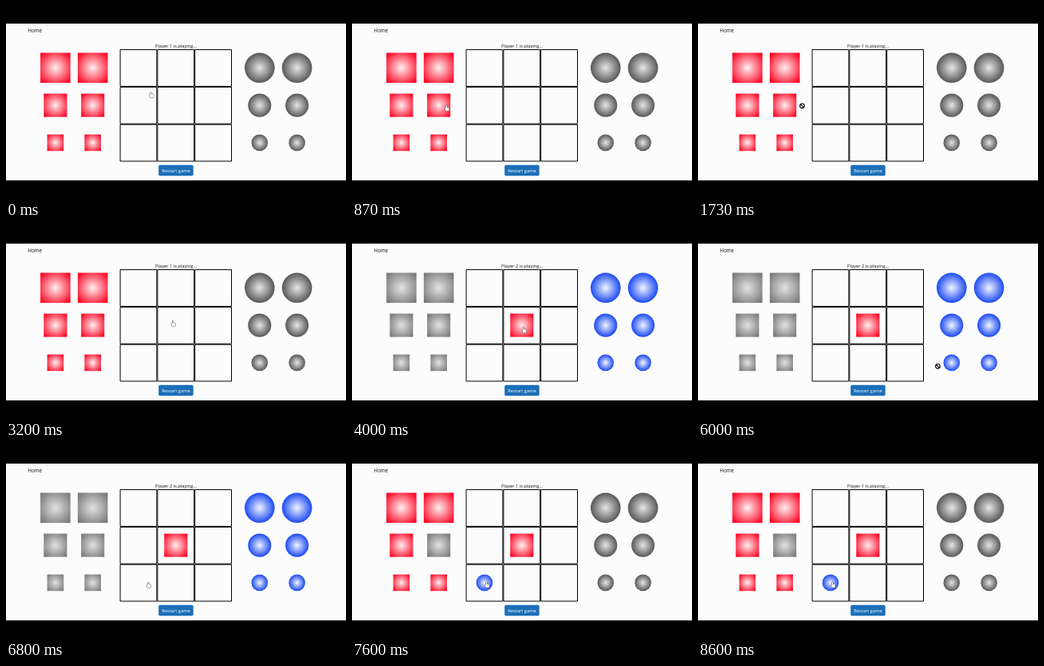
An HTML page with a canvas for the animation above (8670 ms loop, 426 by 240 pixels).

```html
<!DOCTYPE html>
<html lang="en">
<head>
<meta charset="utf-8">
<title>Board game</title>
<style>
html, body { margin: 0; width: 100%; height: 100%; overflow: hidden; background: #000; }
canvas { display: block; width: 100vw; height: 100vh; }
</style>
</head>
<body>
<canvas id="stage"></canvas>
<script>
const W = 426, H = 240, LOOP = 8670;
const canvas = document.getElementById('stage');
const ctx = canvas.getContext('2d');
const FONT = '"Open Sans", "Noto Sans", sans-serif';

// Board and piece racks share one grid step
const STEP = 46.8;
const BOARD = { x: 142.6, y: 54.1 };
const LEFT_X = 61.9, RIGHT_X = 317.8;
const rowY = row => BOARD.y + (row + 0.5) * STEP - 0.2;
const cellX = col => BOARD.x + (col + 0.5) * STEP;
const pieceSize = row => 37.6 - 8.5 * row;

const RED = ['#fff0f0', '#fc0020'];
const RED_OFF = ['#e2e2e2', '#78787b'];
const BLUE = ['#f2f5ff', '#1c4af2'];
const BLUE_OFF = ['#e6e6e6', '#58585b'];

const GRAB_1 = 1480, DROP_1 = 3620;
const GRAB_2 = 5740, DROP_2 = 7080;

// Pointer glides, each starting where the previous one ended
const REST = { x: 181.5, y: 107.5 };
const GLIDES = [
  { start: 250, end: 1050, x: 109, y: 126.5 },
  { start: GRAB_1, end: 2320, x: 209, y: 118.5 },
  { start: 3200, end: DROP_1, x: 215, y: 126.5 },
  { start: 4850, end: 5500, x: 317, y: 176 },
  { start: GRAB_2, end: 6996, x: 168.5, y: 170 }
];

const clamp01 = u => Math.min(1, Math.max(0, u));
const ease = u => u * u * (3 - 2 * u);

function pointerAt(t) {
  return GLIDES.reduce((p, g) => {
    const u = ease(clamp01((t - g.start) / (g.end - g.start)));
    return { x: p.x + (g.x - p.x) * u, y: p.y + (g.y - p.y) * u };
  }, REST);
}

function eachSlot(draw) {
  for (let row = 0; row < 3; row++)
    for (let col = 0; col < 2; col++) draw(row, col);
}

function text(str, x, y, size, color, align) {
  ctx.font = size + 'px ' + FONT;
  ctx.fillStyle = color;
  ctx.textAlign = align;
  ctx.fillText(str, x, y);
}

function radial(x, y, r, [inner, outer]) {
  const g = ctx.createRadialGradient(x, y, 0, x, y, r);
  g.addColorStop(0, inner);
  g.addColorStop(1, outer);
  return g;
}

function square(x, row, colors) {
  const y = rowY(row), size = pieceSize(row);
  ctx.fillStyle = radial(x, y, size * 0.65, colors);
  ctx.fillRect(x - size / 2, y - size / 2, size, size);
}

function disc(x, row, colors) {
  const y = rowY(row), r = pieceSize(row) / 2;
  ctx.fillStyle = radial(x, y, r, colors);
  ctx.beginPath();
  ctx.arc(x, y, r, 0, Math.PI * 2);
  ctx.fill();
}

function drawBoard() {
  ctx.strokeStyle = '#000';
  ctx.lineWidth = 1;
  for (let row = 0; row < 3; row++)
    for (let col = 0; col < 3; col++)
      ctx.strokeRect(BOARD.x + col * STEP + 0.5, BOARD.y + row * STEP + 0.5, STEP - 1, STEP - 1);
}

function drawPieces(t, turn) {
  eachSlot((row, col) => {
    const spent = t >= DROP_1 && row === 1 && col === 1;
    square(LEFT_X + col * STEP, row, turn === 1 && !spent ? RED : RED_OFF);
    disc(RIGHT_X + col * STEP, row, turn === 2 ? BLUE : BLUE_OFF);
  });
  if (t >= DROP_1) square(cellX(1), 1, RED);
  if (t >= DROP_2) disc(cellX(0), 2, BLUE);
}

function overBoard({ x, y }) {
  const dx = x - BOARD.x, dy = y - BOARD.y;
  return Math.min(dx, dy) > 0 && Math.max(dx, dy) < 3 * STEP;
}

function overPiece({ x, y }) {
  let hit = false;
  eachSlot((row, col) => {
    const half = pieceSize(row) / 2;
    for (const left of [LEFT_X, RIGHT_X])
      if (Math.abs(x - left - col * STEP) < half && Math.abs(y - rowY(row)) < half) hit = true;
  });
  return hit;
}

// Outline first, then the white inside, so overlapping parts merge
function outlined(path) {
  ctx.lineJoin = 'round';
  ctx.strokeStyle = '#333';
  ctx.lineWidth = 0.9;
  ctx.fillStyle = '#fff';
  ctx.stroke(path);
  ctx.fill(path);
}

function drawHand(x, y) {
  const path = new Path2D();
  path.roundRect(x - 0.5, y, 1.1, 5, 0.5);
  path.roundRect(x - 1.1, y + 2.7, 4.4, 4.4, 1.2);
  path.roundRect(x - 2, y + 3.8, 2, 1.5, 0.6);
  outlined(path);
}

function drawArrow(x, y) {
  const path = new Path2D();
  path.moveTo(x, y);
  path.lineTo(x, y + 6);
  path.lineTo(x + 4.2, y + 4.4);
  path.closePath();
  outlined(path);
}

function drawNoDrop(x, y) {
  ctx.beginPath();
  ctx.arc(x, y, 2.8, 0, Math.PI * 2);
  ctx.moveTo(x - 2, y - 2);
  ctx.lineTo(x + 2, y + 2);
  ctx.fillStyle = '#fff';
  ctx.fill();
  ctx.strokeStyle = '#000';
  ctx.lineWidth = 1.15;
  ctx.stroke();
}

function drawPointer(t) {
  const p = pointerAt(t);
  const dragging = (t >= GRAB_1 && t < DROP_1) || (t >= GRAB_2 && t < DROP_2);
  if (overBoard(p)) drawHand(p.x, p.y);
  else if (dragging) drawNoDrop(p.x, p.y);
  else if (overPiece(p)) drawHand(p.x, p.y);
  else drawArrow(p.x, p.y);
}

function drawButton() {
  ctx.fillStyle = '#1b6fb9';
  ctx.beginPath();
  ctx.roundRect(191.2, 198.7, 43.5, 13.6, 1.8);
  ctx.fill();
  text('Restart game', 213, 207.8, 5.75, '#fff', 'center');
}

function draw(t) {
  const turn = t >= DROP_1 && t < DROP_2 ? 2 : 1;
  ctx.fillStyle = '#000';
  ctx.fillRect(0, 0, W, H);
  ctx.fillStyle = '#fcfcfc';
  ctx.fillRect(0, 22, W, 196);
  text('Home', 27.2, 33.2, 6.35, '#111', 'left');
  text(`Player ${turn} is playing...`, 213, 52, 5.7, '#111', 'center');
  drawBoard();
  drawPieces(t, turn);
  drawButton();
  drawPointer(t);
}

function resize() {
  const ratio = window.devicePixelRatio || 1;
  canvas.width = Math.round(innerWidth * ratio);
  canvas.height = Math.round(innerHeight * ratio);
}

const start = performance.now();
function tick() {
  ctx.setTransform(canvas.width / W, 0, 0, canvas.height / H, 0, 0);
  draw((performance.now() - start) % LOOP);
  requestAnimationFrame(tick);
}

addEventListener('resize', resize);
resize();
tick();
</script>
</body>
</html>
```
